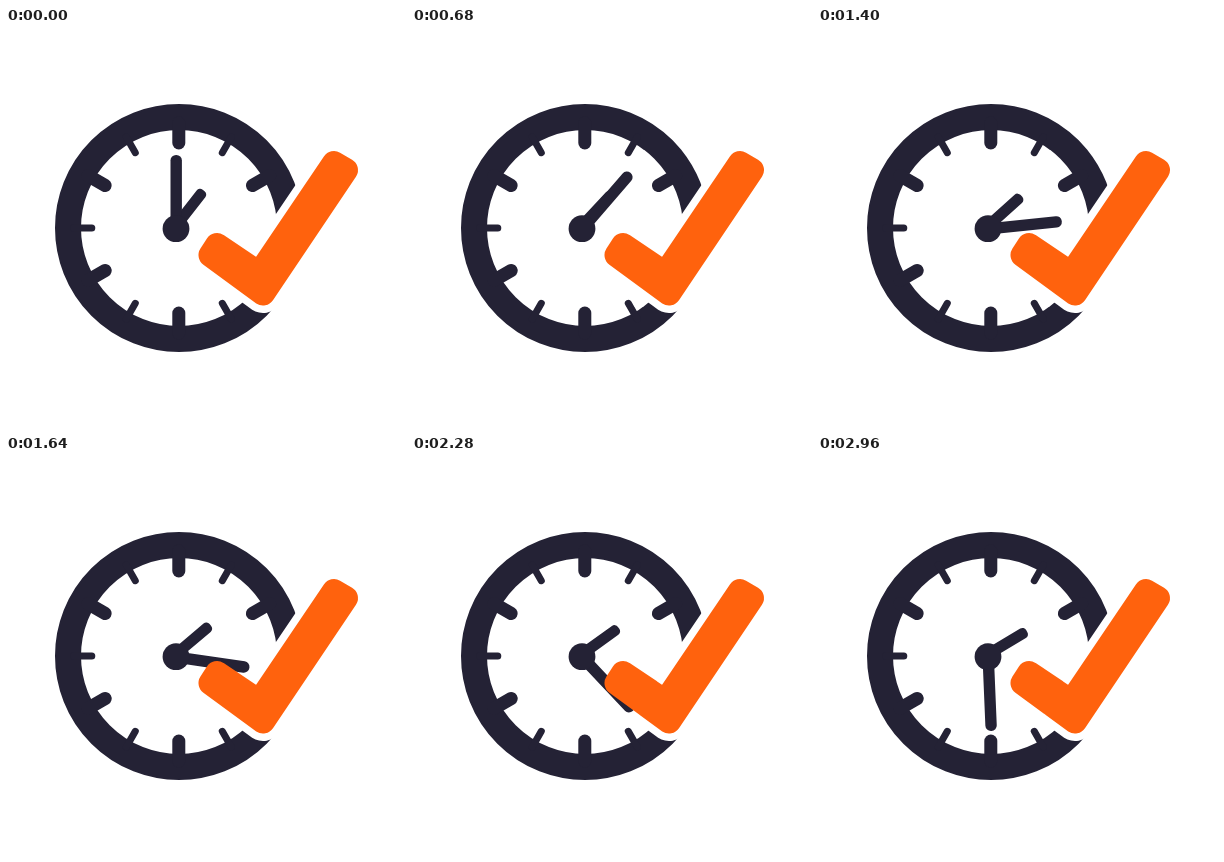
Recreate the animation shown at these times as an HTML page. Size 400x400 px, loop 3000 ms.

```html
<!DOCTYPE html>
<html lang="en">
<head>
<meta charset="utf-8">
<title>Clock with check mark</title>
<style>
  html, body { margin: 0; width: 100%; height: 100%; overflow: hidden; background: #fff; }
  svg { display: block; width: 100%; height: 100%; }
</style>
</head>
<body>
<svg viewBox="0 0 400 400">
  <defs>
    <path id="check" stroke-linejoin="round"
      d="M211 217 L253.3 245.4 L328 135 L340 142 L257 265.5 L204.5 227 Z"/>
  </defs>
  <circle cx="173" cy="200" r="111" fill="none" stroke="#242235" stroke-width="26"/>
  <g id="ticks" stroke="#242235" stroke-linecap="round"></g>
  <use href="#check" fill="#fff" stroke="#fff" stroke-width="39"/>
  <g fill="#242235">
    <rect id="hour" x="164" y="152.8" width="11" height="46" rx="4.3"/>
    <rect id="minute" x="164.5" y="127" width="11.4" height="74" rx="5.5"/>
    <circle cx="170" cy="200.7" r="13.4"/>
  </g>
  <use href="#check" fill="#ff620d" stroke="#ff620d" stroke-width="24"/>
</svg>
<script>
  const LOOP = 3000, STEP = 40;
  const byId = id => document.getElementById(id);

  // The check mark covers the 3 and 4 o'clock ticks.
  byId('ticks').innerHTML = [0, 1, 2, 5, 6, 7, 8, 9, 10, 11].map(h => {
    const major = h % 2 === 0;
    return `<path d="M172.8 ${major ? 115 : 113} V95" stroke-width="${major ? 13 : 7}"
      transform="rotate(${h * 30} 172.8 200)"/>`;
  }).join('');

  const turn = (id, angle, x, y) =>
    byId(id).setAttribute('transform', `rotate(${angle} ${x} ${y})`);

  function draw(now) {
    const p = Math.floor(now % LOOP / STEP) * STEP / LOOP;
    turn('minute', 180 * p, 170.2, 201);
    turn('hour', 38 + 21.5 * p, 169.5, 198.5);
    requestAnimationFrame(draw);
  }
  draw(0);
</script>
</body>
</html>
```
